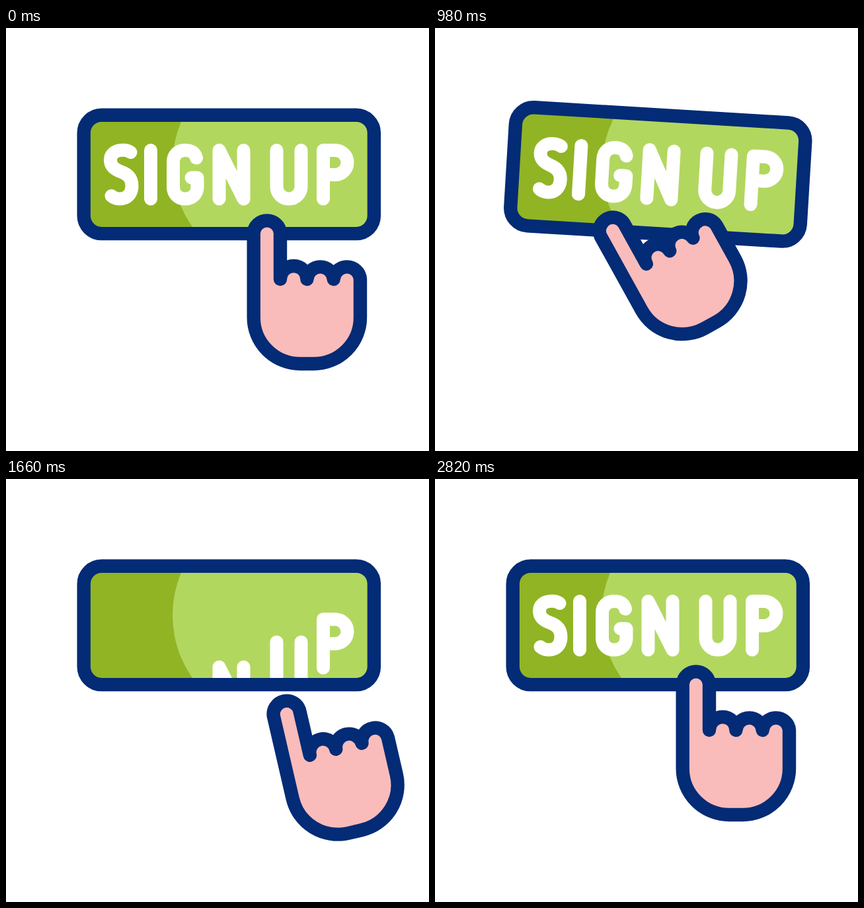
Animation, 640 px wide and 640 px high, one loop 3000 ms. Source, as an HTML page:

```html
<!DOCTYPE html>
<html lang="en">
<head>
<meta charset="utf-8">
<title>Sign up button</title>
<style>
  html, body { margin: 0; width: 100%; height: 100%; overflow: hidden; background: #fff; }
  svg { display: block; width: 100%; height: 100%; }
  .line { fill: none; stroke: #032b76; stroke-width: 20.4; stroke-linejoin: round; }
  #letters { fill: none; stroke: #fff; stroke-width: 20; stroke-linecap: round; stroke-linejoin: round; }
</style>
</head>
<body>
<svg viewBox="0 0 640 640" role="img" aria-label="SIGN UP">
  <defs>
    <clipPath id="face"><rect x="118" y="132" width="439" height="179" rx="27"/></clipPath>
  </defs>
  <g id="button">
    <g clip-path="url(#face)">
      <rect x="118" y="132" width="439" height="179" fill="#91b424"/>
      <path d="M417 41A165 165 0 0 0 417 371H580V41Z" fill="#b2d75f"/>
      <g id="letters">
        <path d="M188.5 188Q184 184.7 177 184.7C164 184.7 158 192 158 199.500C158 209 164 214 174 217.500C184 221 190.500 227 190.500 239C190.500 251 183 258.500 172 258.500C166 258.500 163 257 159.500 254"/>
        <path d="M219 185V258.500"/>
        <path d="M288 196.500C286 188.500 280 185 271 185C260 185 253 192 253 203V240C253 251 260 258.500 271 258.500C283 258.500 289.500 250 289.500 240V226.500H280.500"/>
        <path d="M322.500 258.500V185L359.500 258.500V185"/>
        <path d="M409.500 185V240a18.500 18.500 0 0 0 37 0V185"/>
        <path d="M480 258.500V185H498a18.500 18.500 0 0 1 0 37H480"/>
      </g>
    </g>
    <rect class="line" x="117.700" y="131.700" width="439.200" height="179.400" rx="27"/>
  </g>
  <g id="hand">
    <path class="line" style="fill:#fabcba" d="M415 380V310a20.200 20 0 0 0-40.300 0V438a70.500 70 0 0 0 70.500 70h20.300a70.500 70 0 0 0 70.500-70V380a20.200 20 0 0 0-40.300 0a20.200 20 0 0 0-40.300 0a20.200 20 0 0 0-40.400 0Z"/>
  </g>
</svg>
<script>
  const LOOP = 3000, DROP = 153, STAGGER = 100;
  const button = document.getElementById('button');
  const hand = document.getElementById('hand');
  const letters = [...document.getElementById('letters').children];

  // Keys: [time, x, y, angle] of the palm
  const REST = [455, 400, 0], TAP = [364.5, 355, -29], AWAY = [519.2, 436.8, -11.2];
  const handKeys = [
    [200, ...REST], [720, ...TAP], [1100, ...TAP],
    [1800, ...AWAY], [2200, ...AWAY], [2810, ...REST]
  ];
  const tiltKeys = [[720, 0], [900, 6], [1080, 0]];
  const exitKeys = [[1000, 0], [1600, DROP]];
  const enterKeys = [[1600, -DROP], [2200, 0]];

  const ease = u => u * u * (3 - 2 * u);

  function sample(keys, t) {
    if (t <= keys[0][0]) return keys[0].slice(1);
    for (let i = 1; i < keys.length; i++) {
      const a = keys[i - 1], b = keys[i];
      if (t < b[0]) {
        const k = ease((t - a[0]) / (b[0] - a[0]));
        return a.slice(1).map((v, j) => v + (b[j + 1] - v) * k);
      }
    }
    return keys[keys.length - 1].slice(1);
  }

  function draw(t) {
    const [x, y, angle] = sample(handKeys, t);
    hand.setAttribute('transform', `translate(${x} ${y}) rotate(${angle}) translate(-455 -400)`);

    const [tilt] = sample(tiltKeys, t);
    button.setAttribute('transform', `rotate(${tilt} 337.3 221.4)`);

    letters.forEach((el, i) => {
      const local = t - i * STAGGER;
      const [dy] = sample(local < 1600 ? exitKeys : enterKeys, local);
      el.setAttribute('transform', `translate(0 ${dy})`);
    });
  }

  const start = performance.now();
  function tick() {
    draw((performance.now() - start) % LOOP);
    requestAnimationFrame(tick);
  }
  draw(0);
  requestAnimationFrame(tick);
</script>
</body>
</html>
```
